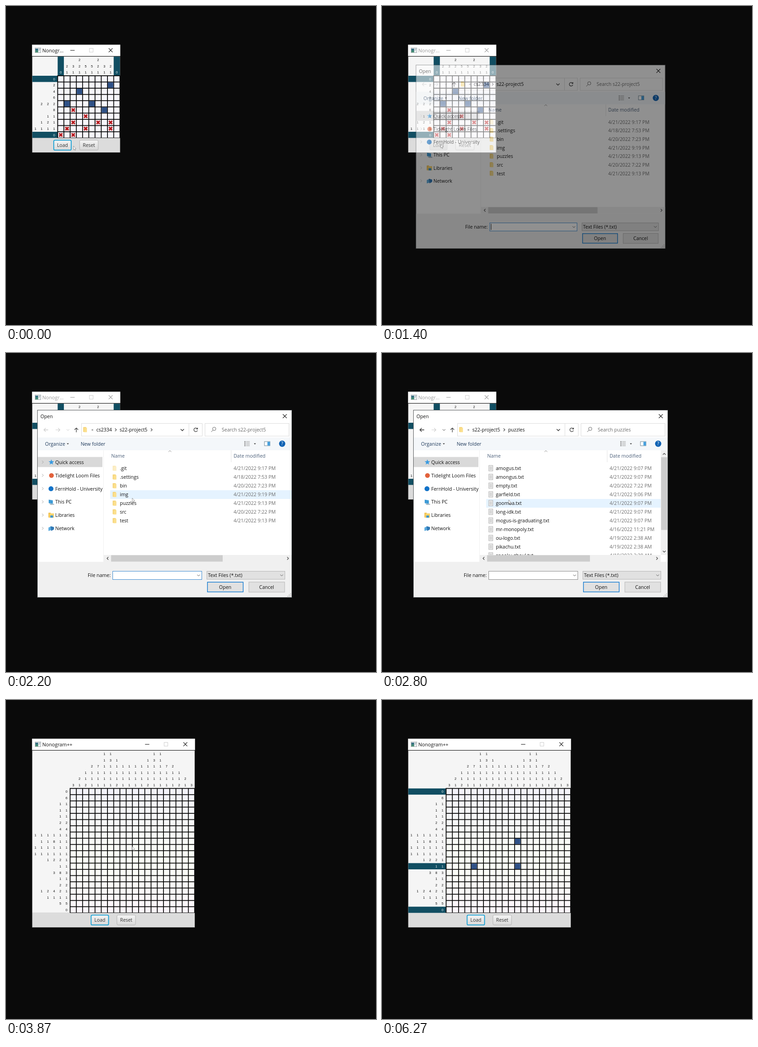
Recreate the animation shown at these times as an HTML page. Size 806 px wide and 695 px high, loop 6.99 s.

```html
<!DOCTYPE html>
<html lang="en">
<head>
<meta charset="utf-8">
<title>Nonogram++</title>
<style>
html, body { margin: 0; width: 100%; height: 100%; overflow: hidden; background: #0a0a0a; }
svg { display: block; width: 806px; height: 695px; }
text { font-family: "Open Sans", "Noto Sans", sans-serif; white-space: pre; }
.num { font-family: "Liberation Sans", Arial, sans-serif; }
</style>
</head>
<body>
<svg viewBox="0 0 806 695">
  <defs>
    <linearGradient id="btn" x2="0" y2="1"><stop stop-color="#f4f4f4"/><stop offset="1" stop-color="#d8d8d8"/></linearGradient>
    <linearGradient id="hot" x2="0" y2="1"><stop stop-color="#fafafa"/><stop offset="1" stop-color="#e2e2e2"/></linearGradient>
    <linearGradient id="down" x2="0" y2="1"><stop stop-color="#d2d2d2"/><stop offset="1" stop-color="#c3c3c3"/></linearGradient>
    <linearGradient id="pic" x2="0" y2="1"><stop stop-color="#2c6284"/><stop offset="1" stop-color="#4d9a72"/></linearGradient>
    <linearGradient id="paper" gradientUnits="userSpaceOnUse" x1="0" y1="192" x2="0" y2="464">
      <stop stop-color="#f3f2fa"/><stop offset=".6" stop-color="#fbfff5"/><stop offset="1" stop-color="#fcf4fb"/>
    </linearGradient>
    <clipPath id="tree"><rect x="69" y="212" width="142" height="243"/></clipPath>
    <clipPath id="list"><rect x="213" y="212" width="410" height="228"/></clipPath>
  </defs>
  <g id="scene"></g>
</svg>
<script>
const LOOP = 6990, CELL = 13.56, LEFT = 57.3, TOP = 110.3;
const TEAL = '#114e62', INK = '#111';

const box = (x, y, w, h, fill, stroke, sw = 1, rx = 0) =>
  `<rect x="${x}" y="${y}" width="${w}" height="${h}" rx="${rx}" fill="${fill}"` +
  (stroke ? ` stroke="${stroke}" stroke-width="${sw}"` : '') + '/>';
const line = (d, stroke, sw = 1) => `<path d="${d}" fill="none" stroke="${stroke}" stroke-width="${sw}"/>`;
const shape = (d, fill) => `<path d="${d}" fill="${fill}"/>`;
const text = (x, y, s, fill = INK, size = 10.5, anchor = 'start') =>
  `<text x="${x}" y="${y}" font-size="${size}" fill="${fill}" text-anchor="${anchor}">${s}</text>`;
const num = (x, y, s, fill) =>
  `<text class="num" x="${x}" y="${y + 2.6}" font-size="7.4" fill="${fill}" text-anchor="middle">${s}</text>`;
const cross = (x, y, r, c, sw) =>
  line(`M${x - r} ${y - r}L${x + r} ${y + r}M${x + r} ${y - r}L${x - r} ${y + r}`, c, sw);
const chevron = (x, y, dx, dy, c, sw = 1) => dy
  ? line(`M${x - 3} ${y - dy * 1.5}l3 ${dy * 3}l3 ${-dy * 3}`, c, sw)
  : line(`M${x - dx * 1.5} ${y - 3}l${dx * 3} 3l${-dx * 3} 3`, c, sw);

// Value of the last entry whose time has passed
const at = (keys, t) => keys.reduce((v, k) => t >= k[0] ? k.slice(1) : v, keys[0].slice(1));

/* ---------- puzzle windows ---------- */

const small = {
  deep: 3, wide: 4, paper: '#f7f6fc',
  cols: '0 21 31 221 51 51 221 31 21 0'.split(' '),
  rows: '0 2 4 6 222 8 11 121 1111 0'.split(' '),
  fills: [[8, 1], [3, 2], [1, 4], [5, 4], [7, 5]],
  marks: [[2, 5], [4, 6], [2, 7], [6, 7], [8, 7], [1, 8], [4, 8], [8, 8], [0, 9], [2, 9]],
  doneCols: [0, 9], doneRows: [0, 9], name: 'Nonogr...'
};
const half = '3 21 112 2111 7111 111111 131111 11112 1111 1111'.split(' ');
const big = {
  deep: 6, wide: 6, paper: 'url(#paper)',
  cols: [...half, ...half.slice().reverse()],
  rows: '0 6 11 11 11 22 44 111111 11811 111111 111111 1221 11 383 11 22 12421 1111 55 0'.split(' '),
  marks: [], doneCols: [], name: 'Nonogram++'
};

function button(cx, cy, w, label, look) {
  const fill = { hot: 'url(#hot)', down: 'url(#down)' }[look] || 'url(#btn)';
  const ring = look === 'focus' || look === 'hot';
  return box(cx - w / 2, cy - 10.8, w, 21.6, fill, ring ? '#16a0d4' : '#b2b2b2', ring ? 1.8 : 1, 2.5) +
    text(cx, cy + 3.9, label, '#333', 10.4, 'middle');
}

function board(p) {
  const n = p.cols.length, x0 = LEFT + p.wide * CELL + 1, y0 = TOP + p.deep * CELL + 1;
  const size = n * CELL;
  let s = box(57.3, 110.2, x0 + size - 57.3, y0 + size - 110.2, '#f5f5f5');
  p.doneCols.forEach(c => s += box(x0 + c * CELL, 110.2, CELL, y0 - 110.2, TEAL));
  p.doneRows.forEach(r => s += box(57.3, y0 + r * CELL, x0 - 57.3, CELL, TEAL));
  s += box(x0 - .9, y0 - .9, size + 1.6, size + 1.6, '#050505');
  for (let r = 0; r < n; r++) for (let c = 0; c < n; c++)
    s += box((x0 + c * CELL + .9).toFixed(2), (y0 + r * CELL + .9).toFixed(2), 11.8, 11.8, p.paper);
  p.fills.forEach(([c, r]) => s += box(x0 + c * CELL + .9, y0 + r * CELL + .9, 11.8, 11.8, '#2f5187'));
  p.marks.forEach(([c, r]) => s += cross(x0 + (c + .5) * CELL, y0 + (r + .5) * CELL, 3.5, '#b71c20', 3.3));
  p.cols.forEach((h, c) => [...h].forEach((d, i) => s += num(x0 + (c + .5) * CELL,
    TOP + (p.deep - h.length + i + .5) * CELL + .3, d, p.doneCols.includes(c) ? '#e6eef0' : INK)));
  p.rows.forEach((h, r) => [...h].forEach((d, i) => s += num(LEFT + (p.wide - h.length + i + .5) * CELL,
    y0 + (r + .5) * CELL + .2, d, p.doneRows.includes(r) ? '#e6eef0' : INK)));
  return s;
}

function puzzle(p, active, look) {
  const n = p.cols.length, right = LEFT + 1 + (p.wide + n) * CELL + .6;
  const bottom = TOP + 1 + (p.deep + n) * CELL;
  const w = right - 56.4, ink = active ? '#111' : '#999', mid = 56.4 + w / 2;
  return box(56.4, 83.8, w + .4, bottom + 32 - 83.8, '#333') +
    box(56.8, 84.4, w - .2, 24.8, '#fff') +
    box(56.8, 109.2, w - .2, 1, '#111') +
    box(63.3, 91.3, 12.6, 10.4, '#e9edef', '#8b9296', .8) +
    box(64, 93, 6, 8, 'url(#pic)') + line('M71.5 94h3M71.5 96.5h1.5', '#62777f', 1) +
    text(79, 101, p.name, ink, 10.7) +
    line(`M${right - 108.6} 96.6h9.4`, ink) +
    box(right - 67, 92.4, 8, 8, 'none', '#cfcfcf') +
    cross(right - 20.8, 96.4, 4.2, ink, 1.1) +
    board(p) +
    box(57.3, bottom, w - 1.3, 31.4, '#dcdcdc') +
    button(mid - 29.5, bottom + 15.5, 38, 'Load', look) +
    button(mid + 28, bottom + 15.5, 40.5, 'Reset');
}

/* ---------- file dialog ---------- */

const folders = [['.git', '4/21/2022 9:17 PM'], ['.settings', '4/18/2022 7:53 PM'], ['bin', '4/20/2022 7:23 PM'],
  ['img', '4/21/2022 9:19 PM'], ['puzzles', '4/21/2022 9:13 PM'], ['src', '4/20/2022 7:22 PM'], ['test', '4/21/2022 9:13 PM']];
const files = [['amogus', '4/21/2022 9:07 PM'], ['amongus', '4/21/2022 9:07 PM'], ['empty', '4/20/2022 7:22 PM'],
  ['garfield', '4/21/2022 9:06 PM'], ['goomba', '4/21/2022 9:07 PM'], ['long-idk', '4/21/2022 9:07 PM'],
  ['mogus-is-graduating', '4/21/2022 9:07 PM'], ['mr-monopoly', '4/16/2022 11:21 PM'], ['ou-logo', '4/19/2022 2:38 AM'],
  ['pikachu', '4/19/2022 2:38 AM'], ['spooky-ghoul', '4/19/2022 2:38 AM']];
const places = ['Quick access', 'Tidelight Loom Files', 'FernHold - University', 'This PC', 'Libraries', 'Network'];

const folder = (x, y, o = 1) => `<g opacity="${o}">` + box(x, y - 5.5, 6.5, 10.5, '#f3cf6b') +
  shape(`M${x + 1.5} ${y - 4}h6.5v9.5h-6.5z`, '#fbdf8d') + '</g>';
const page = (x, y) => box(x, y - 6, 8.6, 12, '#f4f4f4', '#a5a5a5', .9) +
  line(`M${x + 1.6} ${y - 3}h5.4m-5.4 2h5.4m-5.4 2h5.4m-5.4 2h5.4`, '#a9a9a9', .8);

function star(x, y) {
  let d = '';
  for (let i = 0; i < 10; i++) {
    const a = i * Math.PI / 5 - Math.PI / 2, r = i % 2 ? 2.7 : 6.3;
    d += (i ? 'L' : 'M') + (x + r * Math.cos(a)).toFixed(2) + ' ' + (y + r * Math.sin(a)).toFixed(2);
  }
  return shape(d + 'Z', '#3a9be0');
}

const icons = [
  y => star(98.8, y),
  y => `<circle cx="99" cy="${y}" r="5.2" fill="#e2623c"/>`,
  y => `<circle cx="98" cy="${y}" r="5.4" fill="#1272c8"/>`,
  y => shape(`M93 ${y - 5}l9 1.5v7.5l-9 -1.5z`, '#3d9bd6') + shape(`M94 ${y + 3.5}l10 .5l1.5 2l-8 .3z`, '#9fb4c2'),
  y => box(92.5, y - 5.5, 5, 10.5, '#f0bd45') + box(94.5, y - 4, 10, 9.3, '#fbd46d') + box(96.5, y + .5, 6, 4.8, '#3c94cf'),
  y => shape(`M92.5 ${y - 2}l6 -2.5v8l-6 2z`, '#5aaade') + shape(`M97 ${y - 5}l7.5 2v5l-6 3.5z`, '#2f78b5')
];

function treePane(d) {
  let s = box(69, 226.5, 141, 22, '#d9d9d9');
  if (d.place) s += box(69, 284.8, 142, 21.6, '#e5f3ff');
  places.forEach((name, i) => {
    const y = 238 + i * 28.86;
    s += `<g opacity="${d.arrows}">${chevron(80, y - .3, 1, 0, '#a0a0a0')}</g>` + icons[i](y) + text(107.3, y + 3.9, name);
  });
  return `<g clip-path="url(#tree)">${s}</g>`;
}

function listPane(d) {
  const end = d.inside ? 607 : 622;
  let s = '';
  if (d.row >= 0) s += box(227, 299 + (d.row - 3) * 19, end - 227, 19, d.picked ? '#cce8ff' : '#e5f3ff');
  (d.inside ? files : folders).forEach(([name, date], i) => {
    const y = 251.5 + i * 19;
    s += (d.inside ? page(232.7, y - .5) : folder(232.5, y - .3, i ? 1 : .5)) +
      text(248, y + 3.9, d.inside ? name + '.txt' : name) + text(495.7, y + 3.9, date, '#6d6d6d');
  });
  s = `<g clip-path="url(#list)">${s}</g>`;
  s += text(229.3, 228.3, 'Name', '#4c607a') + text(495.7, 228.3, 'Date modified', '#4c607a') +
    line('M490.5 212v26', '#e5e5e5') + chevron(357, 214, 0, -1, '#888');
  s += box(213, 440, end - 213, 15, '#f0f0f0') + box(229, 440.5, d.inside ? 224 : 243, 14, '#cdcdcd') +
    chevron(221.5, 447.5, -1, 0, '#444', 1.2) + chevron(end - 8, 447.5, 1, 0, '#444', 1.2);
  if (d.inside) s += box(607.5, 212, 14.5, 228, '#f0f0f0') + box(608, 227, 13.5, 158.5, '#cdcdcd') +
    chevron(614.8, 220, 0, -1, '#444', 1.2) + chevron(614.8, 432.5, 0, 1, '#444', 1.2);
  return s;
}

function addressBar(d) {
  const back = d.inside ? '#333' : '#cfcfcf';
  let s = line('M92 167.5h-9.5m4 -4l-4 4l4 4', back, 1.3) +
    line('M108 167.5h9.5m-4 -4l4 4l-4 4', '#cfcfcf', 1.2) +
    chevron(135, 167.5, 0, 1, d.inside ? '#555' : '#cfcfcf') +
    line('M153.2 172.8v-9.5m-4 4l4 -4l4 4', '#444', 1.3) +
    box(164.5, 153.5, 263, 27.5, '#fff', '#dcdcdc') + line('M398.5 153.5v27.5', '#dcdcdc') +
    folder(168.3, 167) + text(186, 170, '«', '#555', 9);
  if (d.inside) s += text(196.8, 171.2, 's22-project5') + chevron(266.2, 167.3, 1, 0, '#333', 1.1) + text(274.7, 171.2, 'puzzles');
  else s += text(196.8, 171.2, 'cs2334') + chevron(239, 167.3, 1, 0, '#333', 1.1) + text(247.6, 171.2, 's22-project5') +
    (d.tail ? chevron(317, 167.3, 1, 0, '#333', 1.1) : '');
  return s + line('M380.5 165.8l3.6 3.6l3.6 -3.6', '#444', 1.5) +
    line('M416.6 165a4 4 0 1 0 .5 3.6M417.3 162.8v2.8h-2.8', '#444', 1.3) +
    box(433.5, 153.5, 183, 27.5, '#fff', '#dcdcdc') +
    '<circle cx="453.6" cy="165.2" r="3.6" fill="none" stroke="#666"/>' + line('M451 168l-4 4', '#666') +
    text(470, 171.2, 'Search ' + (d.inside ? 'puzzles' : 's22-project5'), '#6a6a6a');
}

function dialog(d) {
  let s = box(68.5, 124.5, 554, 408, '#fff', '#55585a') +
    text(75, 142, 'Open') + cross(607.3, 137.6, 4.3, '#111', 1.2) +
    addressBar(d) +
    box(69, 184, 553, 28, '#f4f7fa') +
    text(85, 202, 'Organize', '#1e395b') + shape('M132.5 196.8h4.4l-2.2 2.4z', '#333') +
    text(162.7, 202, 'New folder', '#1e395b') +
    line('M519 193h3m-3 3h3m-3 3h3m-3 3h3', '#777', 1.3) + line('M523 193h8m-8 3h8m-8 3h8m-8 3h8', '#999', 1) +
    shape('M540 196.8h4.4l-2.2 2.4z', '#333') +
    box(563, 193, 12, 9, '#fff', '#6f8796') + box(569.5, 193.5, 5.5, 8.2, '#46a0de') +
    '<circle cx="601.6" cy="197.6" r="6.8" fill="#0f62b4"/>' + text(601.6, 201.4, '?', '#fff', 10.5, 'middle') +
    line('M212.5 212v243', '#f0f0f0') + treePane(d) + listPane(d);
  s += box(69, 455, 553, 77, '#f0f0f0') +
    text(228, 488.3, 'File name:', INK, 10.5, 'end') +
    box(232.5, 475.5, 194, 18, '#fff', d.inside ? '#8a8a8a' : '#3c8ad0') + chevron(419.5, 484.5, 0, 1, '#555') +
    (d.caret ? line('M235.5 477.5v13.5', '#111') : '') +
    (d.file ? text(235.5, 488.3, d.file) : '') +
    box(437.5, 475.5, 170, 17.5, '#e1e1e1', '#b5b5b5') + text(440, 488.3, 'Text Files (*.txt)') +
    chevron(600.5, 484.3, 0, 1, '#555') +
    box(438.8, 499.3, 77.8, 21.2, '#e1e1e1', '#0f78d0', 1.4) + text(477.5, 514, 'Open', INK, 10.5, 'middle') +
    box(529, 499, 78, 22, '#e1e1e1', '#b5b5b5') + text(567.8, 514, 'Cancel', INK, 10.5, 'middle');
  for (let i = 0; i < 3; i++) for (let j = 0; j <= i; j++) s += box(619 - j * 3, 523.5 + i * 3, 1.6, 1.6, '#b0b0b0');
  const k = d.scale;
  return `<g opacity="${d.fade}" transform="translate(${345.5 * (1 - k)} ${328.5 * (1 - k)}) scale(${k})">${s}</g>`;
}

/* ---------- timeline ---------- */

const pointer = [[0, 147, 305], [70, 147, 301], [530, 146, 302], [600, 142, 303], [670, 138, 303], [730, 134, 303],
  [800, 131, 302], [930, 128, 301], [1470, 126, 301], [1730, 200, 308], [1800, 272, 313], [2000, 275, 316],
  [2400, 276, 320], [3870, 275, 319], [4530, 270, 290], [4600, 228, 330], [4730, 182, 372], [4870, 222, 340],
  [4930, 268, 304], [5070, 254, 304], [5130, 206, 340], [5270, 199, 364], [5470, 245, 364], [5530, 295, 364],
  [5730, 298, 336], [5800, 296, 305], [6130, 256, 568], [6270, -50, -50]];
const fades = [[1400, .55, .98], [1470, .91, .9964], [1600, 1, 1], [3470, .6, .995]];
const arrowFade = [[1400, .7], [2000, .85], [2200, 1], [2600, .5], [2800, 0]];
const hover = [[0, -1], [1800, 3], [2400, 4]];

function arrow([x, y]) {
  return `<path transform="translate(${x} ${y})" d="M0 0V8.4L1.9 6.7L3.2 9.6L4.5 9L3.2 6.2H5.6Z" fill="#fff" stroke="#777" stroke-width=".7"/>`;
}

function scene(t) {
  let s;
  if (t < 3870) {
    const active = t < 1200 || t >= 3470;
    const look = t < 670 || t >= 3470 ? 'focus' : t < 1070 ? 'hot' : 'down';
    s = puzzle(small, active, look);
    if (t >= 1400) {
      const [fade, scale] = at(fades, t);
      s += dialog({
        fade, scale, arrows: at(arrowFade, t)[0], row: at(hover, t)[0],
        place: t >= 1470 && t < 1730, caret: t < 2000, tail: t >= 1600, inside: t >= 2800,
        picked: t >= 2600 && t < 2800 || t >= 3330, file: t >= 3330 ? 'goomba.txt' : ''
      });
    }
  } else {
    big.fills = [[5330, 4, 12], [5600, 11, 12], [6130, 11, 8]].filter(k => t >= k[0]).map(k => k.slice(1));
    big.doneRows = [[4130, 0], [4130, 19], [5600, 12]].filter(k => t >= k[0]).map(k => k[1]);
    s = puzzle(big, true, 'focus');
  }
  return s + arrow(at(pointer, t));
}

const stage = document.getElementById('scene');
const start = performance.now();
let last = '';
function tick() {
  const s = scene((performance.now() - start) % LOOP);
  if (s !== last) stage.innerHTML = last = s;
  requestAnimationFrame(tick);
}
tick();
</script>
</body>
</html>
```
